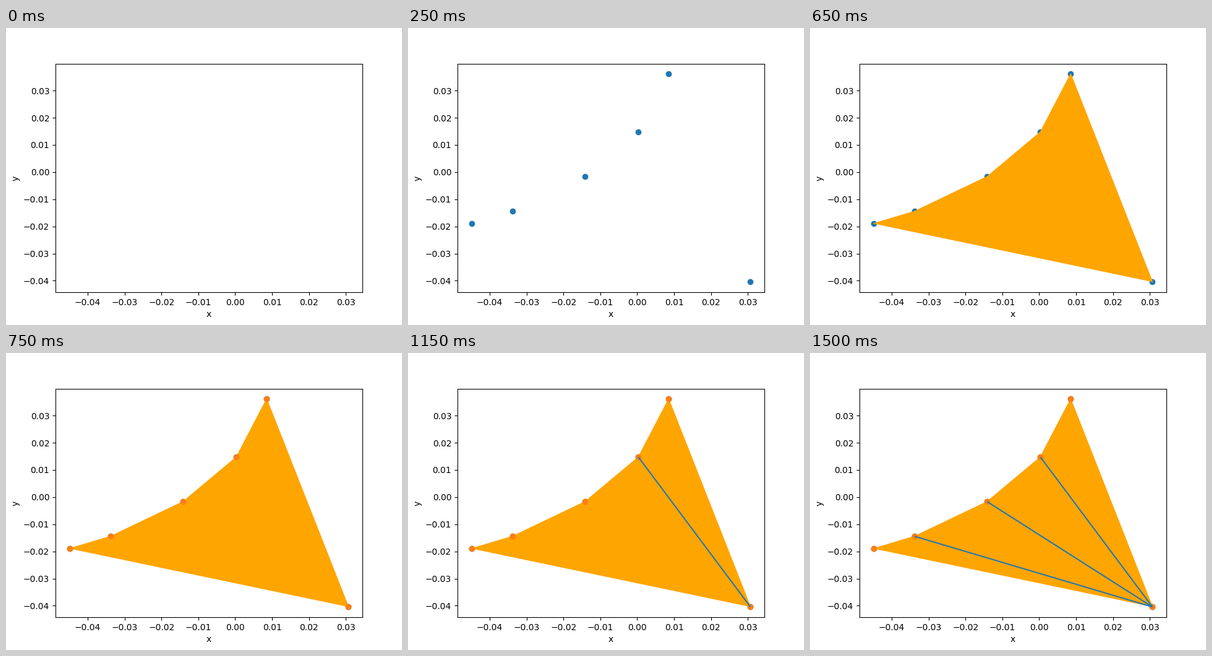
A matplotlib script for the animation above (1750 ms loop, 640 by 480 pixels).

```python
import matplotlib.pyplot as plt
from matplotlib.animation import FuncAnimation
from matplotlib.patches import Polygon

plt.rcParams["font.family"] = "DejaVu Sans"

# Concave chain from the top vertex, closed by the apex of the fan.
points = [
    (0.00852, 0.03609),
    (0.00031, 0.01473),
    (-0.01413, -0.00168),
    (-0.03381, -0.01445),
    (-0.04496, -0.01898),
    (0.03070, -0.04044),
]
chain, apex = points[:-1], points[-1]
xs, ys = zip(*points)

fig, ax = plt.subplots(figsize=(6.4, 4.8), dpi=100)
ax.set_xlabel("x")
ax.set_ylabel("y")


def diagonal(p):
    line, = ax.plot(*zip(p, apex), color="C0", solid_capstyle="butt")
    return line


# Outline runs apex, top, ..., left; the long lower side has no stroke.
outline = Polygon([apex, *chain], closed=False, color="orange",
                  joinstyle="bevel")

# Artists in order of appearance, one per step.
steps = [
    ax.scatter(xs, ys, color="C0"),
    ax.add_patch(outline),
    ax.scatter(xs, ys, color="C1"),
    *map(diagonal, chain[1:-1]),
]


def update(i):
    for k, artist in enumerate(steps):
        artist.set_visible(k < i)
    return steps


anim = FuncAnimation(fig, update, frames=len(steps) + 1, interval=250,
                     repeat=True, repeat_delay=0, blit=False)
plt.show()
```
